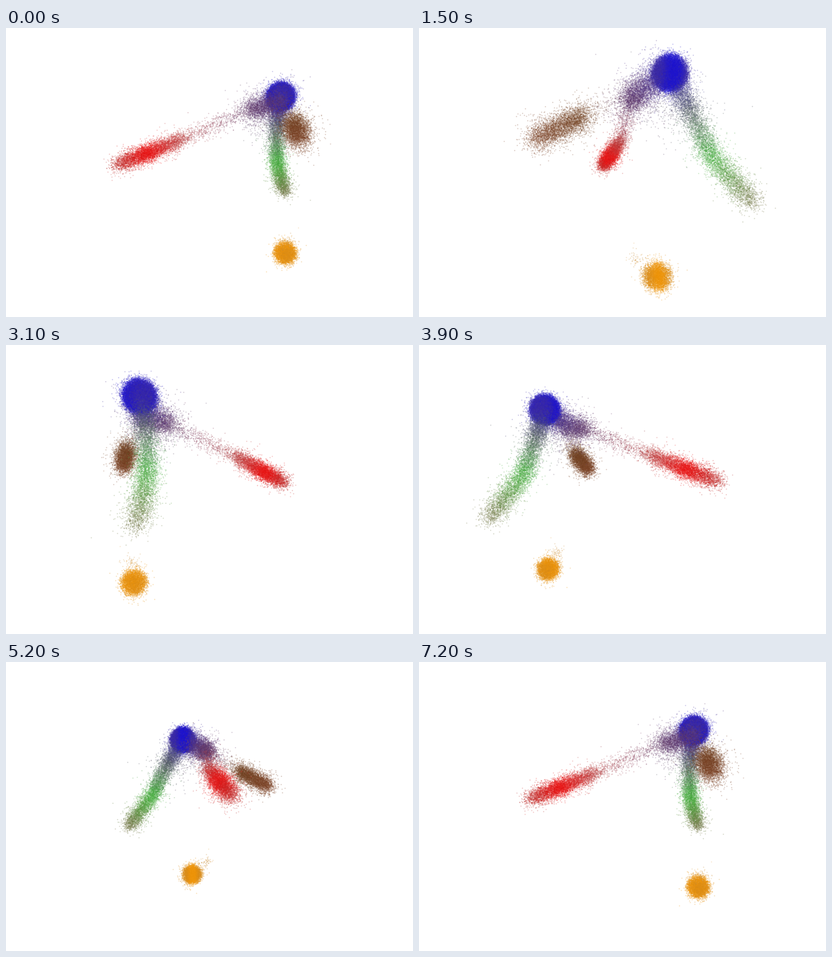
An HTML page with a canvas that plays this animation: 888x631 px, repeating every 7300 ms.

```html
<!DOCTYPE html>
<html lang="en">
<head>
<meta charset="utf-8">
<title>Rotating point cloud</title>
<style>
  html, body { margin: 0; width: 100%; height: 100%; overflow: hidden; background: #fff; }
  canvas { display: block; }
</style>
</head>
<body>
<canvas id="stage" width="888" height="631"></canvas>
<script>
const W = 888, H = 631, CAMERA = 762, STEP = 100, STEPS = 73, TURN = Math.PI / 36;
const ALPHA = 0.24, RADIUS = 1.35, JITTER = 9;
const ctx = document.getElementById('stage').getContext('2d');
const image = ctx.createImageData(W, H);
const px = image.data;

let seed = 20417;
function rand() {
  seed = (seed + 0x6D2B79F5) | 0;
  let t = Math.imul(seed ^ (seed >>> 15), 1 | seed);
  t = (t + Math.imul(t ^ (t >>> 7), 61 | t)) ^ t;
  return ((t ^ (t >>> 14)) >>> 0) / 4294967296;
}
const gauss = () => Math.sqrt(-2 * Math.log(1 - rand())) * Math.cos(2 * Math.PI * rand());
const mix = (p, q, t) => p.map((v, i) => v + (q[i] - v) * t);
const ramp = (v, lo, hi) => Math.min(1, Math.max(0, (v - lo) / (hi - lo)));

// A landmark has two ground coordinates, a height and a colour.
const mark = (a, b, h, ...rgb) => ({ at: [a, b, h], rgb });
const head = mark(164, 42, 175, 56, 40, 165);
const neck = mark(163, 83, 108, 88, 96, 100);
const leaf = mark(171, 122, 27, 68, 176, 60);
const foot = mark(203, 183, -53, 116, 112, 68);
const plum = mark(90, -8, 135, 98, 58, 104);
const mauve = mark(144, -12, 147, 90, 55, 114);
const elbow = mark(-62, 10, 73, 182, 64, 64);
const red = mark(-137, 4, 42, 234, 18, 18);
const hand = mark(-203, -3, 16, 184, 48, 46);
const bark = mark(155, -106, 96, 112, 66, 34);
const tip = mark(149, -188, 54, 124, 66, 38);
const sun = mark(169, 17, -180, 216, 138, 22);
const stray = mark(165, -26, -143, 206, 150, 70);

const points = [];
function add(at, rgb, jitter) {
  const j = gauss() * jitter;
  points.push({ at, near: 0, rgb: rgb.map(c => Math.min(255, Math.max(0, c + j))) });
}

// Fuzzy line of points between two landmarks; a larger pull crowds them towards the first.
function limb(from, to, count, width, pull = 1) {
  for (let i = 0; i < count; i++) {
    const t = rand() ** pull, spread = width * (rand() < 0.08 ? 1.8 : 1);
    add(mix(from.at, to.at, t).map(v => v + gauss() * spread), mix(from.rgb, to.rgb, t), JITTER);
  }
}

// Soft-edged ball, bright around its middle plane.
function ball({ at, rgb }, bright, count, radius, soft) {
  for (let i = 0; i < count; i++) {
    const dir = [gauss(), gauss(), gauss()], len = Math.hypot(...dir);
    const r = radius * Math.cbrt(rand()) + gauss() * soft * (rand() < 0.15 ? 2.5 : 1);
    const off = dir.map(v => v / len * r);
    add(at.map((c, k) => c + off[k]), mix(bright, rgb, ramp(Math.abs(off[1]) / radius, 0.25, 0.7)), JITTER / 3);
  }
}

ball(head, [28, 18, 205], 15000, 32, 3.5);
ball(sun, [237, 147, 8], 4800, 24, 4.5);
limb(stray, sun, 80, 8, 2.5);

limb(head, neck, 2600, 11);
limb(leaf, neck, 2300, 10.5, 1.2);
limb(leaf, foot, 2500, 10.5);

limb(mauve, head, 2000, 14);
limb(plum, head, 1300, 12, 1.2);
limb(plum, mauve, 1300, 13, 1.2);
limb(plum, neck, 450, 25);

limb(elbow, plum, 750, 10, 1.3);
limb(red, elbow, 2700, 9.5, 1.4);
limb(red, hand, 2700, 9.5, 1.4);

limb(mauve, bark, 280, 12);
limb(bark, tip, 4200, 11);

function dot(x, y, rgb) {
  const left = Math.floor(x - 2), top = Math.floor(y - 2);
  if (left < 0 || top < 0 || left + 5 > W || top + 5 > H) return;
  for (let v = top; v < top + 5; v++) {
    for (let u = left; u < left + 5; u++) {
      const cover = RADIUS + 0.5 - Math.hypot(u + 0.5 - x, v + 0.5 - y);
      if (cover <= 0) continue;
      const k = ALPHA * Math.min(1, cover), i = (v * W + u) * 4;
      for (let c = 0; c < 3; c++) px[i + c] += (rgb[c] - px[i + c]) * k;
    }
  }
}

function draw(step) {
  const cos = Math.cos(step * TURN), sin = Math.sin(step * TURN);
  px.fill(255);
  for (const p of points) p.near = p.at[0] * sin - p.at[1] * cos;
  points.sort((p, q) => p.near - q.near);
  for (const { at: [a, b, h], near, rgb } of points) {
    const s = CAMERA / (CAMERA - near);
    dot(W / 2 + (a * cos + b * sin) * s, H / 2 - h * s, rgb);
  }
  ctx.putImageData(image, 0, 0);
}

const start = performance.now();
let shown = 0;
function tick() {
  const step = Math.floor(Math.max(0, performance.now() - start) / STEP) % STEPS;
  if (step !== shown) draw(shown = step);
  requestAnimationFrame(tick);
}
draw(0);
requestAnimationFrame(tick);
</script>
</body>
</html>
```
